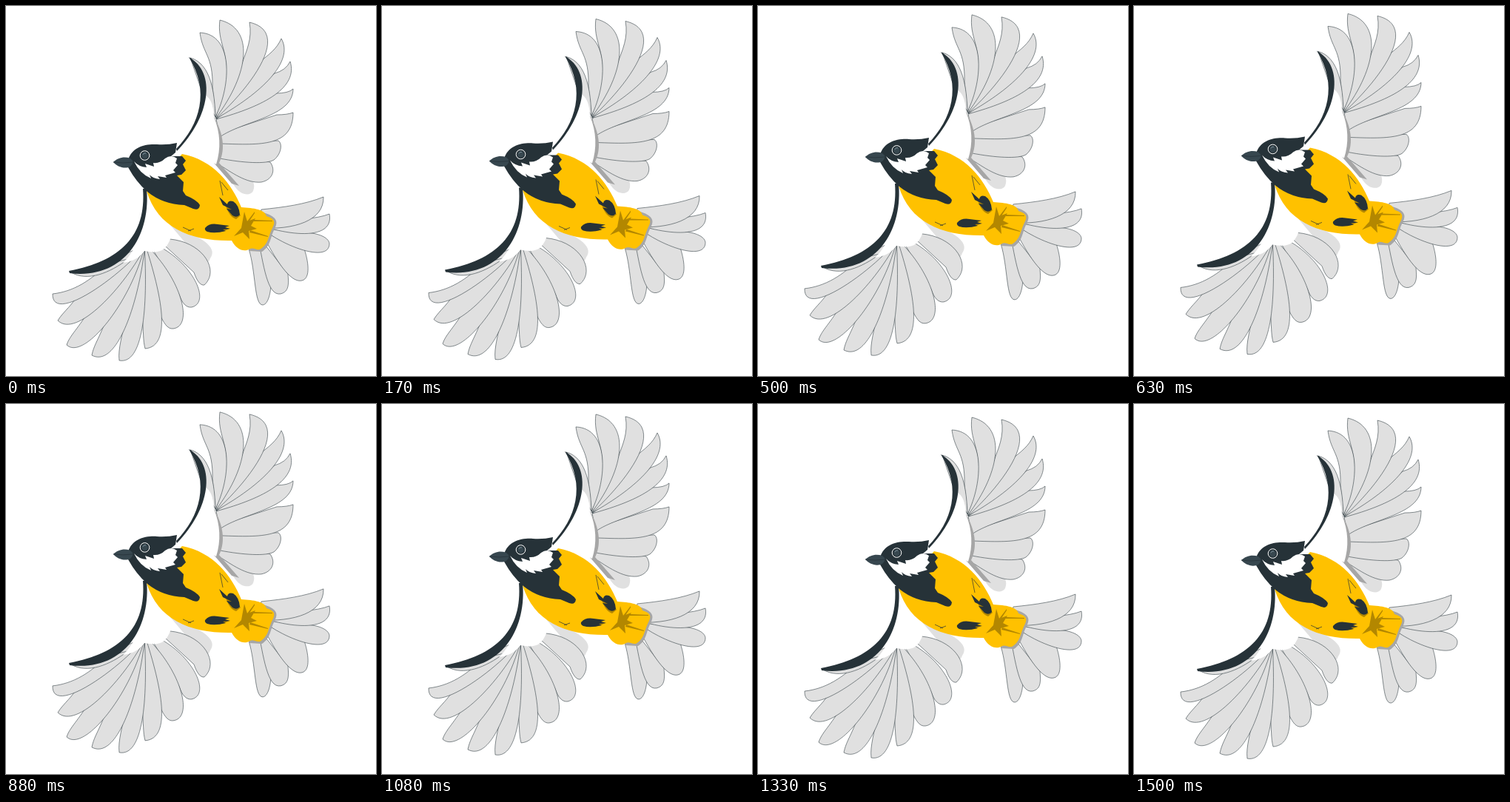
An HTML page that plays this animation: 500x500 px, repeating every 1540 ms.

```html
<!DOCTYPE html>
<html lang="en">
<head>
<meta charset="utf-8">
<title>Flying bird</title>
<style>
  html, body { margin: 0; width: 100%; height: 100%; overflow: hidden; background: #fff; }
  svg { display: block; width: 100vw; height: 100vh; }
  .feathers { fill: #e0e0e0; stroke: #263238; stroke-width: .55; stroke-linejoin: round; }
  .soft { stroke: none; }
  .dark { fill: #263238; }
  .white { fill: #fff; }
  .shade { fill: #a6a6a6; }
  .line { fill: none; stroke: #263238; stroke-width: .7; }
</style>
</head>
<body>
<svg viewBox="0 0 500 500">
  <defs>
    <path id="body" d="M238 200C280 208 305 240 318 272C335 273 350 275 352 284C362 287 365 291 360 300C354 312 355 322 343 329C338 330 334 326 330 328C322 333 312 330 305 317C250 318 205 300 190 250Z"/>
  </defs>
  <g id="bird">
    <!-- upper wing -->
    <g class="feathers">
      <path class="soft" d="M286 213L310 245C318 256 330 257 334 250Q337 243 333 235Z"/>
      <path d="M286 213C305 225 325 240 345 238C360 235 365 222 357 211L289 200Z"/>
      <path d="M289 206C320 212 352 214 362 208C372 200 374 186 368 182L290 184Z"/>
      <path d="M290 186C345 188 388 190 388 144Q380 147 366 147L289 172Z"/>
      <path d="M289 177C320 155 388 150 388 112Q382 118 364 118L284 153Z"/>
      <path d="M284 153C350 135 395 110 384 75Q378 87 363 91Z"/>
      <path d="M284 152C345 118 390 75 372 44C366 58 355 66 342 76Z"/>
      <path d="M284 152C335 105 385 35 329 22C333 45 325 60 318 80Z"/>
      <path d="M283 152C330 90 335 30 289 19C285 50 302 60 296 100Z"/>
      <path d="M283 150C305 105 307 38 262 36C266 66 280 66 279 110Z"/>
      <path d="M283 150C282 120 278 78 249 70L268 125Z"/>
    </g>
    <path class="shade" d="M279 146C297 176 295 198 288 212L315 243L305 240L280 211Z"/>
    <path class="white" d="M240 192L268 120Q280 125 281 150Q294 182 284 214Z"/>
    <path class="dark" d="M247 69C285 90 276 150 231 196L230 193C262 160 276 115 247 69Z"/>

    <!-- lower wing -->
    <g class="feathers">
      <path class="soft" d="M222 296C260 310 288 325 276 341Q274 348 266 348Z"/>
      <path d="M205 315C260 310 292 355 268 377C263 378 258 372 254 360Z"/>
      <path d="M192 318C250 340 279 400 251 407C244 408 238 402 234 390Z"/>
      <path d="M188 322C235 365 255 432 226 436C218 437 213 428 207 415Z"/>
      <path d="M188 322C210 390 225 460 188 463C185 452 186 440 184 420Z"/>
      <path d="M187 322C192 410 185 485 153 479C151 462 158 445 161 420Z"/>
      <path d="M188 322C180 400 150 490 116 472C119 456 128 447 138 415Z"/>
      <path d="M188 322C170 400 105 480 82 458C86 445 98 436 114 408Z"/>
      <path d="M190 322C160 380 95 450 70 425C78 412 90 405 100 385Z"/>
      <path d="M190 322C150 370 62 430 63 389C90 386 115 372 140 345Z"/>
      <path d="M88 360C110 373 140 361 165 342Z"/>
    </g>
    <path class="white" d="M187 250Q188 320 158 347Q177 345 187 331Q205 335 214 328Q222 320 225 304L200 260Z"/>
    <path class="dark" d="M185 247C190 310 155 345 85 358L86 361C160 370 196 310 190 247Z"/>

    <!-- tail -->
    <g class="feathers">
      <path d="M328 328C338 360 335 404 347 404C355 403 358 385 358 375L350 310Z"/>
      <path d="M340 310C348 350 353 392 371 389C383 386 382 375 381 362Z"/>
      <path d="M345 305C365 345 385 375 400 371C412 368 409 345 402 325Z"/>
      <path d="M345 300C375 325 437 348 437 321C436 312 420 306 400 306Z"/>
      <path d="M340 295C380 310 444 318 437 281Q425 286 400 288Z"/>
      <path d="M340 300C390 303 430 290 429 258C405 268 375 272 345 275Z"/>
    </g>
    <path class="shade" d="M340 276L356 282C368 288 367 294 362 303C357 313 358 324 346 332L328 331L340 300Z"/>

    <!-- body -->
    <use href="#body" fill="#ffc100"/>
    <g fill="#b38700">
      <path d="M322 278L326 291L337 287L331 297L339 301L328 304L329 315L320 306L308 311L318 300Z"/>
      <path d="M296 267L308 270L317 283L311 288Q301 285 296 267ZM272 304L292 299L302 301Q286 309 272 304Z"/>
      <path d="M326 291l10-13 0 2-8 12zM335 289l25 1v1l-25 0zM330 303l24 8v1l-25-6z"/>
    </g>
    <path class="dark" d="M288 258L299 268Q300 262 307 264Q315 269 316 282Q312 287 306 283L298 274L305 275L293 269ZM269 300Q275 293 286 295L302 297L296 299L303 301L293 302L297 304Q282 308 272 305Q268 303 269 300Z"/>
    <path class="line" d="M289 236Q291 246 293 256M291 238L300 249M239 299L250 304M246 304L254 301"/>

    <!-- head -->
    <path class="dark" d="M165 208C170 191 187 186 204 187Q218 188 231 185L229 198L223 203L238 203L243 209L239 214L243 222L237 228L231 229L240 238L239 250L243 256Q258 262 262 269Q261 277 253 274L241 269Q212 268 191 251Q176 238 165 218Z"/>
    <path class="white" d="M173 210Q179 217 190 218L188 213L200 217L199 212Q208 213 215 206Q223 200 231 206L229 212L232 215L226 222L229 225L215 229L217 232L205 230L208 234Q198 233 194 228L196 233Q181 227 173 210Z"/>
    <path fill="#37474f" d="M145 211C151 205 160 203 168 206Q175 211 168 217C160 221 150 217 145 211Z"/>
    <path class="line" d="M145 211Q158 213 172 211"/>
    <circle cx="187.5" cy="202" r="6.3" fill="#263238" stroke="#fff"/>
    <circle cx="187.5" cy="202" r="4.4" fill="#37474f"/>
    <path d="M185 201Q186 198 189 199" fill="none" stroke="#90a4ae" stroke-width=".8"/>
  </g>
</svg>
<script>
  const bird = document.getElementById('bird');
  const period = 1540, lead = 40, swing = 4.5;
  const wave = t => swing * Math.cos(2 * Math.PI * (t + lead) / period);
  const start = performance.now();

  function draw(now) {
    const t = Math.max(0, now - start) % period;
    bird.setAttribute('transform', `translate(0 ${(wave(t) - wave(0)).toFixed(2)})`);
    requestAnimationFrame(draw);
  }
  draw(start);
</script>
</body>
</html>
```
